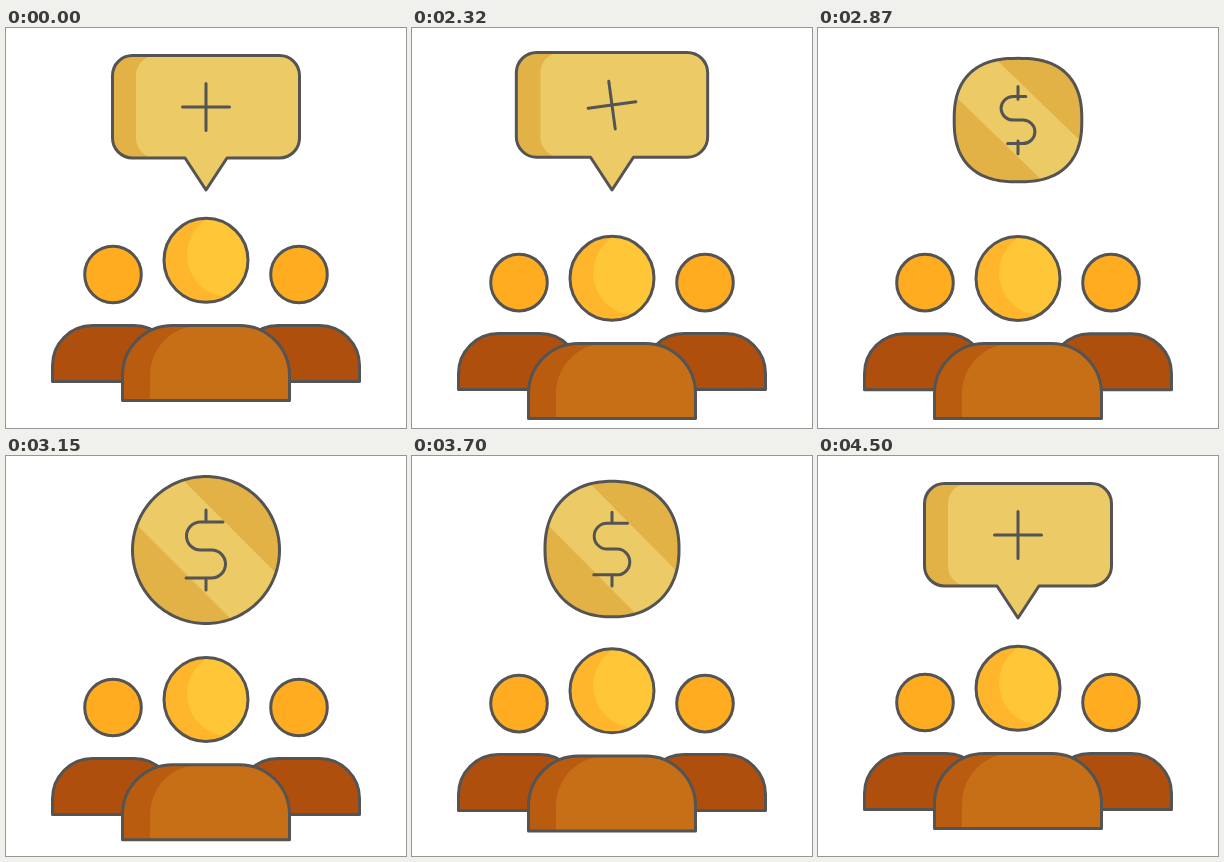
Animation of 400x400 px, one loop 4.52 s. Source, as an HTML page with a canvas:

```html
<!DOCTYPE html>
<html lang="en">
<head>
<meta charset="utf-8">
<title>Team funding</title>
<style>
  html, body { margin: 0; width: 100%; height: 100%; overflow: hidden; background: #fff; }
  canvas { display: block; width: 100vw; height: 100vh; }
</style>
</head>
<body>
<canvas id="stage" width="400" height="400"></canvas>
<script>
const ctx = document.getElementById('stage').getContext('2d');
const LOOP = 4520, START = 2020;
const INK = '#545454', GOLD = '#e3b246', PALE_GOLD = '#ecca66';

const lerp = (a, b, p) => a + (b - a) * p;
const span = (t, a, b) => Math.min(1, Math.max(0, (t - a) / (b - a)));
const smooth = p => p * p * (3 - 2 * p);
const easeOut = p => 1 - (1 - p) * (1 - p);

// cubic-bezier(.25, .1, .25, 1)
function ease(x) {
  let lo = 0, hi = 1;
  for (let i = 0; i < 24; i++) {
    const s = (lo + hi) / 2, r = 1 - s;
    if (0.75 * r * s + s * s * s < x) lo = s; else hi = s;
  }
  const s = lo, r = 1 - s;
  return 0.3 * r * r * s + 3 * r * s * s + s * s * s;
}

// Builds a path in a local frame; its outline keeps a constant weight.
function stroke(path, matrix) {
  const out = new Path2D();
  out.addPath(path, matrix);
  ctx.stroke(out);
}

function shape(path, base, matrix = new DOMMatrix(), inner, tint) {
  const out = new Path2D();
  out.addPath(path, matrix);
  ctx.fillStyle = base;
  ctx.fill(out);
  if (inner) {
    const part = new Path2D();
    part.addPath(inner, matrix);
    ctx.save();
    ctx.clip(out);
    ctx.fillStyle = tint;
    ctx.fill(part);
    ctx.restore();
  }
  ctx.stroke(out);
}

function circle(x, y, r) {
  const p = new Path2D();
  p.arc(x, y, r, 0, Math.PI * 2);
  return p;
}

function dome(left, right, top, bottom, r) {
  const p = new Path2D();
  p.roundRect(left, top, right - left, bottom - top, [r, r, 0, 0]);
  return p;
}

function lines(...segments) {
  const p = new Path2D();
  for (const [x1, y1, x2, y2] of segments) {
    p.moveTo(x1, y1);
    p.lineTo(x2, y2);
  }
  return p;
}

function bubblePath(left) {
  const right = 293.5, top = 27.5, bottom = 130, r = 20;
  const p = new Path2D();
  p.moveTo(left + r, top);
  p.arcTo(right, top, right, bottom, r);
  p.arcTo(right, bottom, 221, bottom, r);
  p.lineTo(221, bottom);
  p.lineTo(200, 162);
  p.lineTo(179, bottom);
  p.arcTo(left, bottom, left, top, r);
  p.arcTo(left, top, right, top, r);
  p.closePath();
  return p;
}

const BUBBLE = bubblePath(106.5), BUBBLE_LIGHT = bubblePath(130);
const PLUS = lines([-23.5, 0, 23.5, 0], [0, -23.5, 0, 23.5]);
const SIDE_BODY = dome(46.5, 168, 297.5, 353.5, 40);
const BODY = dome(116.5, 283.5, 297.5, 372.5, 50);
const BODY_LIGHT = dome(144, 330, 297.5, 372.5, 50);
const BAND = new Path2D('M-160-207L160 113V204L-160-116Z');

function drawPeople(t) {
  const drop = 20 * (ease(span(t, START, 2504)) - ease(span(t, 2700, 4400)));
  const side = new DOMMatrix().translate(0, drop * 0.45);
  const mirrored = side.translate(400, 0).scale(-1, 1);
  for (const m of [side, mirrored]) {
    shape(SIDE_BODY, '#ae4f0e', m);
    shape(circle(107, 246.5, 28.3), '#ffac21', m);
  }
  const mid = new DOMMatrix().translate(0, drop);
  shape(BODY, '#ba5c10', mid, BODY_LIGHT, '#c66f17');
  shape(circle(200, 232.3, 42), '#ffb62c', mid, circle(223, 227, 42), '#ffc637');
}

function drawBubble(flip, size, angle) {
  const m = new DOMMatrix().translate(200, 162).scale(size * flip, size).translate(-200, -162);
  shape(BUBBLE, GOLD, m, BUBBLE_LIGHT, PALE_GOLD);
  stroke(PLUS, m.translate(200, 79).rotate(angle));
}

function superellipse(r, n) {
  const p = new Path2D();
  const bend = v => Math.sign(v) * Math.abs(v) ** (2 / n) * r;
  for (let i = 0; i < 180; i++) {
    const a = i * Math.PI / 90;
    p.lineTo(bend(Math.cos(a)), bend(Math.sin(a)));
  }
  p.closePath();
  return p;
}

function dollar(reach) {
  const p = lines([0, -40, 0, lerp(-22, -28, reach)], [0, lerp(22, 28, reach), 0, 40]);
  p.moveTo(lerp(2, 17, reach), -28);
  p.lineTo(-5.5, -28);
  p.arc(-5.5, -14, 14, -Math.PI / 2, Math.PI / 2, true);
  p.lineTo(5.5, 0);
  p.arc(5.5, 14, 14, -Math.PI / 2, Math.PI / 2);
  p.lineTo(lerp(-5, -20, reach), 28);
  return p;
}

function drawCoin(flip, height, reach) {
  const squash = 1 - height;
  const m = new DOMMatrix().translate(200, 94 - 12 * squash).scale(flip, height);
  shape(superellipse(73.5, 2 + 3 * squash), GOLD, m, BAND, PALE_GOLD);
  stroke(dollar(reach), m);
}

function drawToken(t) {
  if (t < START) {
    drawBubble(1, 1, 0);
  } else if (t < 2680) {
    const dip = easeOut(span(t, 1990, 2080)), swell = smooth(span(t, 2080, 2540));
    const turn = span(t, 2540, 2680);
    drawBubble(Math.max(0.01, 1 - turn * turn), 1 - 0.025 * dip + 0.09 * swell,
      3 * dip - 20 * swell - 20 * turn);
  } else if (t < 3940) {
    const grow = smooth(span(t, 2680, 3080)), leave = smooth(span(t, 3500, 3940));
    const away = span(t, 3600, 3940);
    const flip = easeOut(span(t, 2680, 2980)) * (1 - away * away);
    drawCoin(Math.max(0.01, flip), lerp(0.7, 1, grow) - 0.18 * leave, grow);
  } else {
    drawBubble(Math.max(0.01, easeOut(span(t, 3940, 4460))), 1, 0);
  }
}

function frame(now) {
  const t = now % LOOP;
  ctx.fillStyle = '#fff';
  ctx.fillRect(0, 0, 400, 400);
  ctx.strokeStyle = INK;
  ctx.lineWidth = 3;
  ctx.lineCap = ctx.lineJoin = 'round';
  drawPeople(t);
  drawToken(t);
  requestAnimationFrame(now => frame(now - origin));
}

const origin = performance.now();
frame(0);
</script>
</body>
</html>
```
